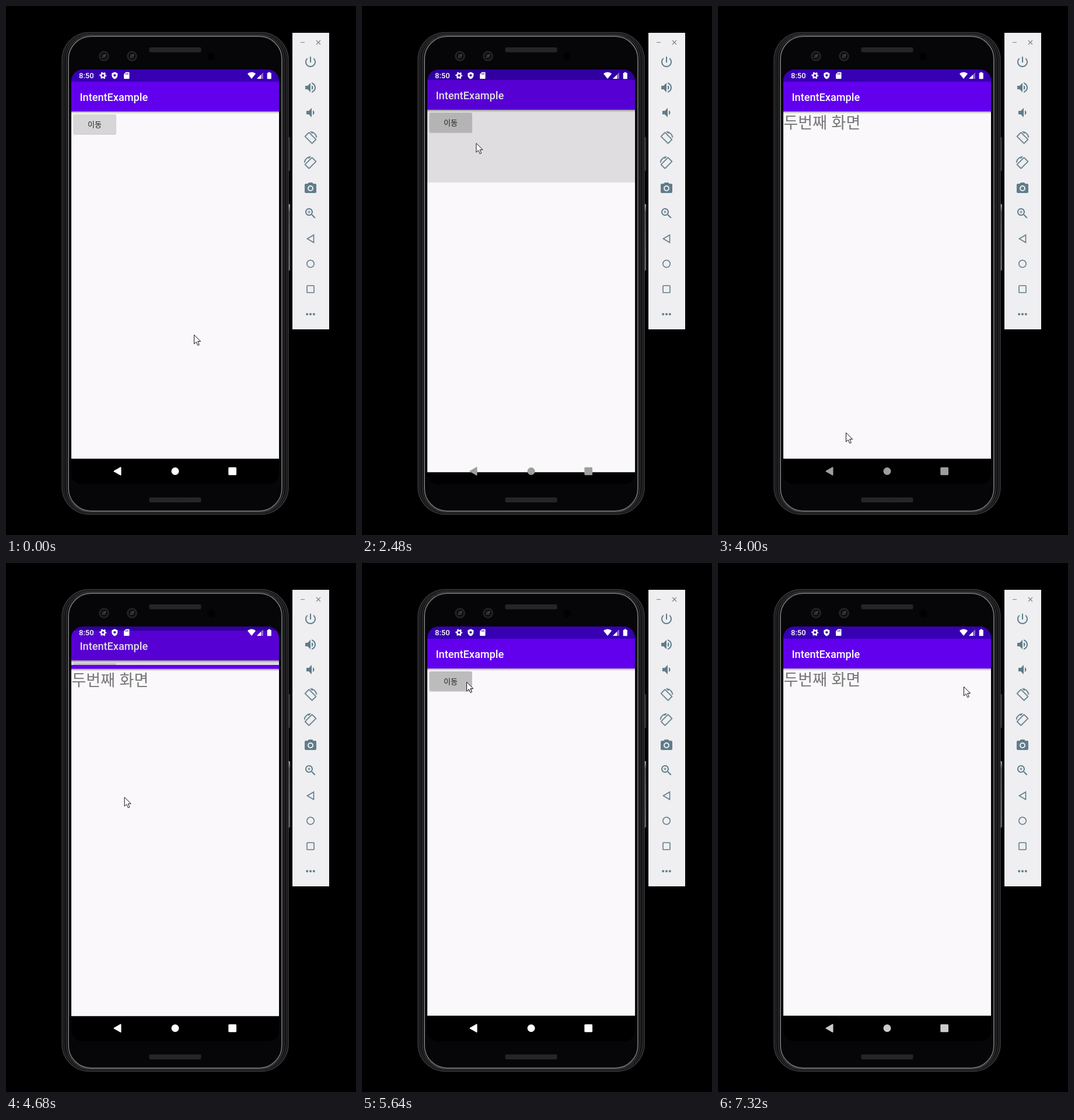
Write an HTML page that moves like this. It is 600x908 px and loops after 7360 ms.

```html
<!DOCTYPE html>
<html lang="ko">
<head>
<meta charset="utf-8">
<title>IntentExample</title>
<style>
html, body { margin: 0; width: 100%; height: 100%; overflow: hidden; background: #000; }
#stage { position: absolute; left: 0; top: 0; width: 600px; height: 908px; overflow: hidden; background: #000; }
#stage svg { position: absolute; left: 0; top: 0; display: block; }
#screen { position: absolute; left: 112px; top: 109px; width: 356px; height: 712px; overflow: hidden; border-radius: 19px; background: #000; }
text { font-family: Roboto, sans-serif; font-weight: 500; }
.ko { font-family: "Noto Sans CJK KR", "Noto Sans CJK", sans-serif; }

#first { animation: firstMove 7360ms cubic-bezier(.4,0,.2,1) infinite, firstDim 7360ms linear infinite; }
#second { animation: secondMove 7360ms cubic-bezier(.4,0,.2,1) infinite, secondClip 7360ms linear infinite; }
#press { animation: press 7360ms linear infinite; }
#nav { animation: nav 7360ms linear infinite; }
#cursor { animation: cursor 7360ms ease-in-out infinite; }

/* window transitions run 425 ms from 2380, 4638 and 5823 ms */
@keyframes firstMove {
  0%, 32.337% { translate: 0 0; }
  38.111%, 63.016% { translate: 0 -14.24px; }
  68.791%, 79.117% { translate: 0 0; }
  84.891%, 100% { translate: 0 -14.24px; }
}
@keyframes firstDim {
  0%, 32.337% { opacity: 1; }
  33.927%, 63.016% { opacity: .88; }
  68.791%, 79.117% { opacity: 1; }
  80.707%, 100% { opacity: .88; }
}
@keyframes secondMove {
  0%, 32.337% { translate: 0 29.2px; }
  38.111%, 63.016% { translate: 0 0; }
  68.791%, 79.117% { translate: 0 29.2px; }
  84.891%, 100% { translate: 0 0; }
}
@keyframes secondClip {
  0% { clip-path: inset(95.9% 0 0 0); }
  32.337%, 79.117% { clip-path: inset(95.9% 0 0 0); animation-timing-function: cubic-bezier(.3,0,.8,.15); }
  33.299%, 80.079% { clip-path: inset(57.54% 0 0 0); animation-timing-function: cubic-bezier(.05,.7,.1,1); }
  38.111% { clip-path: inset(0 0 0 0); }
  63.016% { clip-path: inset(0 0 0 0); animation-timing-function: cubic-bezier(.3,0,.8,.15); }
  63.978% { clip-path: inset(38.36% 0 0 0); animation-timing-function: cubic-bezier(.05,.7,.1,1); }
  68.791% { clip-path: inset(95.9% 0 0 0); }
  84.891%, 100% { clip-path: inset(0 0 0 0); }
}
@keyframes press {
  0%, 26.63%, 35%, 73.37%, 80.5%, 100% { opacity: 0; }
  28.5%, 32.3%, 75.2%, 79.1% { opacity: .12; }
}
@keyframes nav {
  0%, 13.6% { fill: #fff; }
  19%, 58.1% { fill: #9e9e9e; }
  58.7%, 82% { fill: #fff; }
  83.15%, 100% { fill: #cbcbcb; }
}
@keyframes cursor {
  0%, .54% { translate: 322px 564px; }
  6.8% { translate: 232px 310px; }
  10.33%, 12% { translate: 172px 206px; }
  15.8% { translate: 140px 190px; }
  20.11% { translate: 181px 249px; }
  20.65% { translate: 229px 220px; }
  23.91%, 29.3% { translate: 169px 203px; }
  39.13% { translate: 233px 281px; }
  43.5% { translate: 180px 200px; }
  47.1% { translate: 93px 124px; }
  50.27% { translate: 290px 460px; }
  54.35% { translate: 219px 732px; }
  56.79%, 59.24% { translate: 188px 794px; }
  66.3% { translate: 209px 230px; }
  69.57%, 73.37% { translate: 166px 203px; }
  81.52% { translate: 205px 206px; }
  85.87%, 88.59% { translate: 200px 196px; }
  98.37% { translate: 421px 195px; }
  99.4%, 100% { translate: 421px 212px; }
}
</style>
</head>
<body>
<div id="stage">
  <svg width="600" height="908" viewBox="0 0 600 908">
    <defs>
      <linearGradient id="shade" x2="0" y2="1">
        <stop stop-color="#000" stop-opacity=".32"/>
        <stop offset="1" stop-color="#000" stop-opacity="0"/>
      </linearGradient>
      <linearGradient id="rocker" x2="0" y2="1">
        <stop stop-color="#b0b0b2"/>
        <stop offset=".12" stop-color="#4c4c4e"/>
        <stop offset="1" stop-color="#69696b"/>
      </linearGradient>
      <pattern id="mesh" width="3" height="3" patternUnits="userSpaceOnUse">
        <path d="M0 0h3v3H0z" fill="#29292a"/>
        <path d="M0 0h1v1H0zM1.5 1.5h1v1h-1z" fill="#171718"/>
      </pattern>
      <g id="chrome">
        <path fill="#000" d="M112 109h357v712H112z"/>
        <path fill="#fbf8fb" d="M112 180h357v597H112z"/>
        <path fill="url(#shade)" d="M112 181h357v4H112z"/>
        <path fill="#3700b3" d="M112 109h357v22H112z"/>
        <path fill="#6200ee" d="M112 130h357v51H112z"/>
        <text x="126.500" y="163" font-size="18.150" fill="#fff">IntentExample</text>
      </g>
      <g id="lens">
        <circle r="9" fill="#222224"/>
        <circle r="6" fill="#0b0b0d"/>
        <circle r="3.500" fill="#2c2c30"/>
        <circle cx="2" cy="-2" r="1.300" fill="#505056"/>
        <circle cx="-2.500" cy="2" r="1" fill="#444449"/>
      </g>
      <path id="rotate" fill="#5f7d8b" stroke="#5f7d8b" stroke-width=".6" transform="scale(.92) translate(-12 -12)" d="M10.230 1.750c-.590-.590-1.540-.590-2.120 0L1.750 8.110c-.590.590-.590 1.540 0 2.120l12.020 12.020c.590.590 1.540.590 2.120 0l6.360-6.360c.590-.590.590-1.540 0-2.120zM14.830 21.190L2.810 9.170l6.360-6.360 12.020 12.020zM16.480 2.520C19.750 4.070 22.090 7.240 22.450 11h1.500C23.440 4.840 18.290 0 12 0l-.660.030 3.810 3.810z"/>
    </defs>

    <!-- phone body -->
    <rect x="483" y="225" width="4" height="58" rx="1.500" fill="#343436"/>
    <rect x="483" y="340" width="4" height="114" rx="1.500" fill="url(#rocker)"/>
    <rect x="96" y="45.500" width="388" height="827" rx="47" fill="#161618" stroke="#39393b" stroke-width="1.500"/>
    <rect x="99.500" y="48.500" width="381" height="821" rx="44" fill="#0d0d0e" stroke="#252527" stroke-width="2"/>
    <rect x="103.500" y="50" width="373" height="818" rx="41" fill="#060507" stroke="#38383a" stroke-width="1.500"/>
    <rect x="107" y="52" width="366" height="815" rx="39" fill="#060507" stroke="#68686b" stroke-width="2"/>
    <use href="#lens" x="168" y="86"/>
    <use href="#lens" x="216" y="86"/>
    <circle cx="351.500" cy="86.500" r="6.500" fill="#010101"/>
    <rect x="245.500" y="71" width="89" height="8.500" rx="2" fill="url(#mesh)"/>
    <rect x="245.500" y="843.500" width="89" height="8.500" rx="2" fill="url(#mesh)"/>

    <!-- side toolbar -->
    <path fill="#efeef0" d="M491 46h63v509h-63z"/>
    <g fill="none" stroke="#76858d" stroke-width="1.200">
      <path d="M505 62.500h7M532 59l7 7m0-7l-7 7"/>
    </g>
    <g fill="#5f7d8b" fill-rule="evenodd">
      <path transform="translate(510 84)" d="M13 3h-2v10h2V3zm4.830 2.170l-1.420 1.420C17.990 7.860 19 9.810 19 12c0 3.870-3.130 7-7 7s-7-3.130-7-7c0-2.190 1.010-4.140 2.580-5.420L6.170 5.170C4.230 6.820 3 9.260 3 12c0 4.970 4.030 9 9 9s9-4.030 9-9c0-2.740-1.230-5.180-3.170-6.830z"/>
      <path transform="translate(510 128)" d="M3 9v6h4l5 5V4L7 9zM16.500 12c0-1.770-1.020-3.290-2.500-4.030v8.050c1.480-.730 2.500-2.250 2.500-4.020zM14 3.230v2.060c2.890.860 5 3.540 5 6.710s-2.110 5.850-5 6.710v2.060c4.010-.910 7-4.490 7-8.770s-2.990-7.860-7-8.770z"/>
      <path transform="translate(510 171)" d="M18.500 12c0-1.770-1.020-3.290-2.500-4.030v8.050c1.480-.730 2.500-2.250 2.500-4.020zM5 9v6h4l5 5V4L9 9z"/>
      <path transform="translate(510 301)" d="M9 2L7.170 4H4c-1.100 0-2 .9-2 2v12c0 1.100.9 2 2 2h16c1.100 0 2-.9 2-2V6c0-1.100-.9-2-2-2h-3.170L15 2zm3 15a5 5 0 1 1 0-10 5 5 0 0 1 0 10z"/>
      <circle cx="522" cy="313" r="3"/>
      <path transform="translate(510 344)" d="M15.500 14h-.790l-.280-.270A6.500 6.500 0 1 0 13.730 14.430l.270.280v.790l5 4.990L20.490 19zM9.500 14a4.500 4.500 0 1 1 0-9 4.500 4.500 0 0 1 0 9zM12 10h-2v2H9v-2H7V9h2V7h1v2h2z"/>
      <circle cx="516.200" cy="529" r="2"/>
      <circle cx="522" cy="529" r="2"/>
      <circle cx="527.800" cy="529" r="2"/>
    </g>
    <use href="#rotate" transform="translate(522 226.500)"/>
    <use href="#rotate" transform="translate(522 269.500) scale(-1 1)"/>
    <g fill="none" stroke="#5f7d8b" stroke-width="1.600">
      <path d="M516.500 399.500l11-6.500v13z"/>
      <circle cx="522" cy="442.500" r="6.200"/>
      <rect x="516" y="480" width="12" height="12" rx=".8"/>
    </g>
  </svg>

  <div id="screen">
    <svg id="first" width="357" height="712" viewBox="112 109 357 712">
      <use href="#chrome"/>
      <rect x="115.500" y="187" width="73.500" height="34" rx="2" fill="#000" opacity=".16"/>
      <rect x="115.500" y="186" width="73" height="33.500" rx="2" fill="#d6d6d7"/>
      <rect id="press" x="115.500" y="186" width="73" height="33.500" rx="2"/>
      <text class="ko" x="152" y="207.500" font-size="13" text-anchor="middle" fill="#222">이동</text>
    </svg>
    <svg id="second" width="357" height="712" viewBox="112 109 357 712">
      <use href="#chrome"/>
      <text class="ko" x="112.500" y="210" font-size="27" style="font-weight:400" fill="#757575">두번째 화면</text>
    </svg>
  </div>

  <svg width="600" height="908" viewBox="0 0 600 908">
    <!-- status bar -->
    <g fill="#fff">
      <text x="125" y="124.300" font-size="13">8:50</text>
      <g fill="none" stroke="#fff">
        <circle cx="166.300" cy="119.300" r="3.300" stroke-width="2.400"/>
        <circle cx="166.300" cy="119.300" r="5" stroke-width="2" stroke-dasharray="2.618" stroke-dashoffset="1.300"/>
      </g>
      <path d="M186.300 113.300l5 2.200v3.500c0 3-2.200 5.500-5 6.400-2.800-.9-5-3.400-5-6.400v-3.500z"/>
      <circle cx="186.300" cy="119" r="2.100" fill="#3700b3"/>
      <path d="M205.500 113.500h5a1 1 0 0 1 1 1v9.500a1 1 0 0 1-1 1h-7.500a1 1 0 0 1-1-1v-7z"/>
      <path d="M204.500 115.800h1v2h-1zM206.500 115.300h1v2.500h-1zM208.500 115.300h1v2.500h-1z" fill="#3700b3"/>
      <path d="M414 116.300c4-3.600 10-3.600 14 0l-7 8.700z"/>
      <path d="M441 114v11h-11z" opacity=".4"/>
      <path d="M437 118v7h-7z"/>
      <path d="M449.700 113.500h3v1.200h1.300a.8.8 0 0 1 .8.8v9a.8.8 0 0 1-.8.8h-5.500a.8.8 0 0 1-.8-.8v-9a.8.8 0 0 1 .8-.8h1.200z"/>
    </g>
    <!-- navigation bar -->
    <g id="nav">
      <path d="M185 797.700l10.800-6.300q1.700-.7 1.700 1v12.200q0 1.700-1.700 1L185 799.300q-1.100-.8 0-1.600z"/>
      <circle cx="290" cy="798.500" r="6.500"/>
      <rect x="381.300" y="791.800" width="13.700" height="13.500" rx="1.500"/>
    </g>
    <path id="cursor" d="M.5.5v15.500l3.600-3.400 2.700 6 2.500-1.100-2.600-5.900h5z" fill="#fff" stroke="#111" stroke-linejoin="round"/>
  </svg>
</div>
</body>
</html>
```
